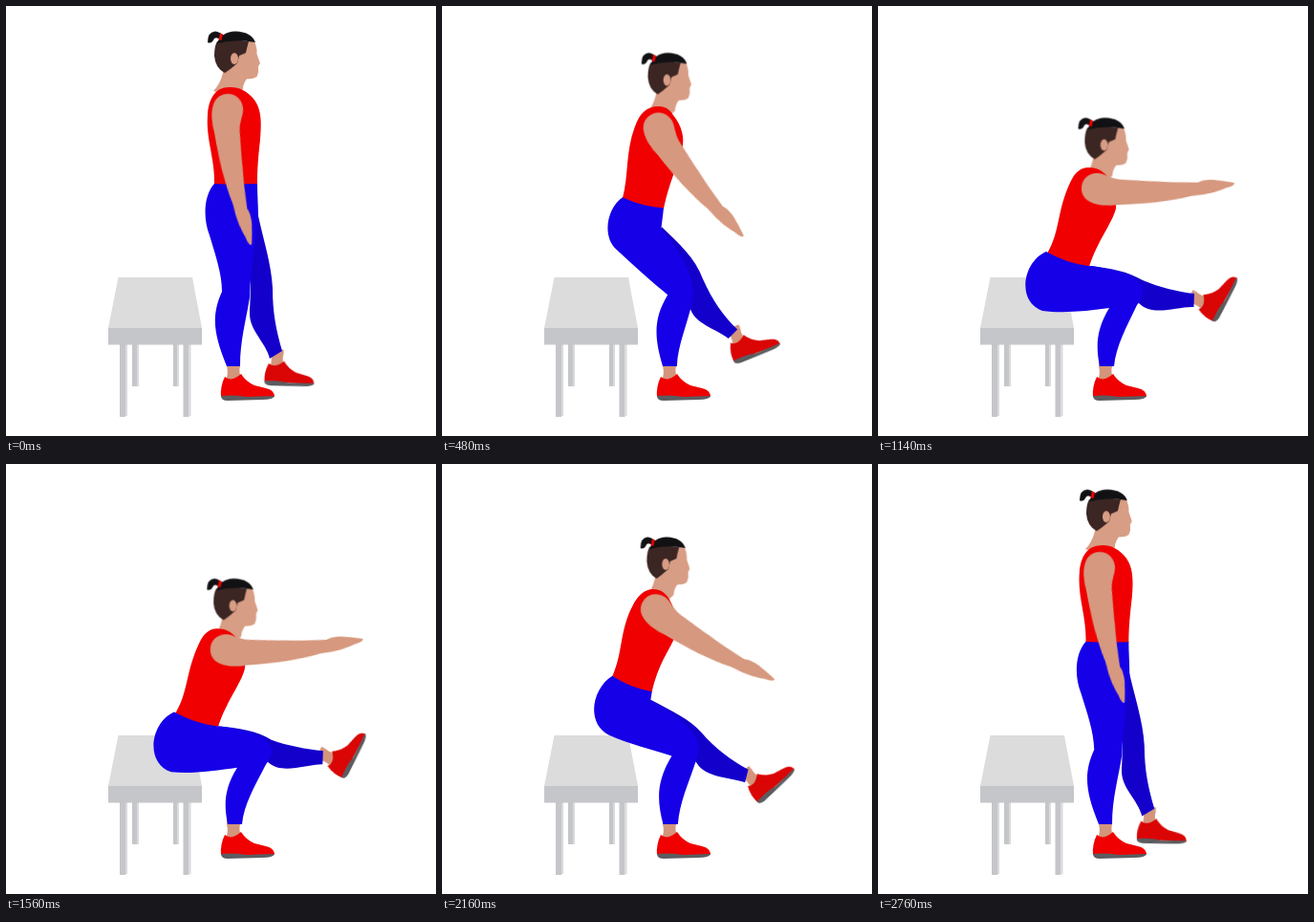
Write an HTML page without scripts that moves like this. It is 450x450 px and loops after 2820 ms.

```html
<!DOCTYPE html>
<html lang="en">
<head>
<meta charset="utf-8">
<title>Single-leg chair squat</title>
<style>
html, body { margin: 0; height: 100%; overflow: hidden; background: #fff; }
svg { display: block; width: 100%; height: 100%; }

/* One pass goes down, the reversed pass comes back up. */
.move { animation: 1410ms linear -2805ms infinite alternate; }
.head { animation-name: head; }
.torso { animation-name: torso; fill: #f00000; }
.arm { animation-name: arm; fill: #d6987e; }
.stand { animation-name: stand; fill: #1500e8; }
.lift { animation-name: lift; fill: #1400cb; }
.foot { animation-name: foot; color: #da0505; }

.skin { fill: #d3957b; }
.face { fill: #d89d85; }
.hair { fill: #3c2623; }
.cap { fill: #111114; }
.red { fill: #f00000; }
.shoe { color: #f00000; }
.upper { fill: currentColor; }
.sole { fill: #5b5c60; }
.top { fill: #dcdcdd; }
.edge { fill: #c5c6ca; }
.side { fill: #d9dadc; }

@keyframes head {
  0% { transform: translate(211px, 27px) scaleX(1); animation-timing-function: cubic-bezier(.5, 0, .8, .4); }
  20% { transform: translate(210px, 31.5px) scaleX(.96); animation-timing-function: cubic-bezier(.33, .17, .7, .62); }
  35% { transform: translate(208.5px, 53px) scaleX(.95); }
  50% { transform: translate(207.5px, 81px) scaleX(.94); }
  65% { transform: translate(207.5px, 106.5px) scaleX(.96); }
  80% { transform: translate(209.5px, 117.5px) scaleX(.97); animation-timing-function: cubic-bezier(.2, .5, .5, 1); }
  100% { transform: translate(210.5px, 121px) scaleX(.97); }
}
@keyframes arm {
  0% { transform: translate(232px, 108px) rotate(80deg); animation-timing-function: cubic-bezier(.5, 0, .8, .4); }
  20% { transform: translate(229px, 111px) rotate(68.3deg); animation-timing-function: cubic-bezier(.33, .17, .7, .62); }
  35% { transform: translate(226px, 131px) rotate(48.4deg); }
  50% { transform: translate(223.5px, 156px) rotate(27.3deg); }
  65% { transform: translate(227px, 181px) rotate(6.1deg); }
  80% { transform: translate(229px, 191px) rotate(-2.4deg); animation-timing-function: cubic-bezier(.2, .5, .5, 1); }
  100% { transform: translate(230px, 195px) rotate(-5deg); }
}
@keyframes foot {
  0% { transform: translate(284px, 364px) rotate(3deg); animation-timing-function: cubic-bezier(.5, 0, .8, .4); }
  20% { transform: translate(289px, 355px) rotate(-8deg); animation-timing-function: cubic-bezier(.33, .17, .7, .62); }
  35% { transform: translate(309.5px, 337px) rotate(-23deg); }
  50% { transform: translate(321px, 321.5px) rotate(-45deg); }
  65% { transform: translate(328px, 310px) rotate(-58.5deg); }
  80% { transform: translate(330.5px, 305px) rotate(-61deg); animation-timing-function: cubic-bezier(.2, .5, .5, 1); }
  100% { transform: translate(331.5px, 303.5px) rotate(-62deg); }
}
@keyframes torso {
  0% { d: path("M218,187 C219,160 209,140 211,114 C212,96 220,85 233,85 C243,84 251,89 255,93 C267,103 268,118 266,140 C264,158 263,170 263,187 Q240,189 218,187 Z"); animation-timing-function: cubic-bezier(.5, 0, .8, .4); }
  20% { d: path("M204,187 C208,165 202,138 206,114 C209,99 217,89 229,89 C237,88 243,91 247,95 C258,104 262,118 260,134 C256,155 249,170 247,193 Q225,195 204,187 Z"); animation-timing-function: cubic-bezier(.33, .17, .7, .62); }
  35% { d: path("M186,204 C193,180 190,155 201,129 C206,115 214,108 226,108 C233,108 238,112 241,118 C250,130 252,142 250,150 C245,170 236,185 229,216 Q206,215 186,204 Z"); }
  50% { d: path("M177,225 C189,200 185,178 199,152 C205,141 212,135 220,135 C228,135 233,139 237,145 C246,162 248,176 243,186 C236,200 224,215 218,243 Q195,240 177,225 Z"); }
  65% { d: path("M176,248 C190,222 186,206 199,177 C204,165 210,160 218,160 C227,160 233,162 238,168 C246,182 249,196 246,206 C240,222 226,240 219,267 Q196,264 176,248 Z"); }
  80% { d: path("M177,259 C191,235 187,215 201,185 C206,174 212,169 220,169 C229,169 234,172 239,177 C247,190 250,202 249,212 C245,228 230,245 221,273 Q197,271 177,259 Z"); animation-timing-function: cubic-bezier(.2, .5, .5, 1); }
  100% { d: path("M177,262 C191,239 188,219 202,189 C207,178 213,173 221,173 C230,173 235,176 240,181 C248,194 252,205 250,215 C246,231 231,248 222,276 Q198,274 177,262 Z"); }
}
@keyframes stand {
  0% { d: path("M218,186 C207,198 206,222 213,240 C219,260 226,280 226,299 C214,325 218,345 231,377 L245,377 C245,350 251,330 255,305 C256,270 262,245 264,220 C264,208 263,197 263,186 Q240,187 218,186 Z"); animation-timing-function: cubic-bezier(.5, 0, .8, .4); }
  20% { d: path("M204,186 C190,197 187,222 200,238 C212,258 222,278 232,299 C217,327 221,347 231,377 L245,377 C246,352 256,330 261,302 C264,280 256,255 246,232 C246,222 247,208 247,193 Q225,193 204,186 Z"); animation-timing-function: cubic-bezier(.33, .17, .7, .62); }
  35% { d: path("M186,203 C169,214 163,246 180,259 C198,274 218,290 237,303 C221,329 223,349 231,377 L246,377 C247,354 257,334 262,311 C268,292 253,262 226,234 C227,228 228,222 229,215 Q206,213 186,203 Z"); }
  50% { d: path("M177,225 C155,238 148,276 174,288 C194,296 220,300 241,306 C225,333 225,352 231.500,377 L247,377 C249,354 258,335 266,312 C276,290 266,275 217,250 C217,248 218,245 218,242 Q195,238 177,225 Z"); }
  65% { d: path("M176,248 C151,260 145,300 171,310 C192,314 220,311 242,313 C227,337 227,356 231.500,377 L247,377 C249,354 259,334 269,311 C284,292 274,278 222,267 C221,267 220,267 219,266 Q196,262 176,248 Z"); }
  80% { d: path("M176,257 C151,268 145,310 172,319 C194,322 220,319 242,316 C228,339 228,357 232,377 L247,377 C249,356 260,336 271,313 C286,294 276,281 224,272 C223,272 222,272 220,272 Q197,269 176,257 Z"); animation-timing-function: cubic-bezier(.2, .5, .5, 1); }
  100% { d: path("M176,260 C151,271 145,314 173,323 C195,325 220,321 242,318 C228,340 228,357 232,377 L247,377 C249,356 260,338 272,315 C287,296 277,283 225,275 C224,275 223,275 221,275 Q198,272 176,260 Z"); }
}
@keyframes lift {
  0% { d: path("M263,215 C268,240 278,270 279,295 C279,322 283,340 289,361 L276,369 C272,352 255,340 255,322 C256,300 258,270 250,230 Z"); animation-timing-function: cubic-bezier(.5, 0, .8, .4); }
  20% { d: path("M246,222 C258,243 270,265 273,289 C278,313 286,335 295,352 L283,358 C277,343 257,335 255,315 C256,295 250,262 236,235 Z"); animation-timing-function: cubic-bezier(.33, .17, .7, .62); }
  35% { d: path("M227,233 C246,250 264,263 273,285 C284,307 296,322 312,336 L303,346 C288,336 264,332 260,314 C258,296 238,280 215,250 Z"); }
  50% { d: path("M217,249 C240,260 259,268 271,280 C286,296 305,309 322,317 L319.500,331 C304,326 278,328 268,313 C255,300 225,290 200,270 Z"); }
  65% { d: path("M219,265 C242,270 262,273 274,284 C290,293 312,301 330,306 L328.500,320 C311,319 285,323 272,310 C258,303 225,300 200,285 Z"); }
  80% { d: path("M220,272 C243,274 262,278 277,287 C294,294 313,299 331,301 L330.500,315 C313,314 288,326 273,311 C258,306 225,303 200,290 Z"); animation-timing-function: cubic-bezier(.2, .5, .5, 1); }
  100% { d: path("M221,275 C244,276 263,280 278,289 C295,295 314,298 332,300 L331.500,314 C314,314 289,326 274,312 C258,308 225,305 200,293 Z"); }
}
</style>
</head>
<body>
<svg viewBox="0 0 450 450">
  <defs>
    <!-- Ankle centre sits at 0,0 -->
    <g id="shoe">
      <path class="skin" d="M-7,-5 L7,-5 L7,0 Q5,7 9,12 L5,19 L-8,16 Q-5,7 -7,0 Z"/>
      <path class="upper" d="M-9,11 Q-2,17 8,8 Q13,16 22,20 L34,23 Q43,25 43,32 L-13,32 Q-14,21 -9,11 Z"/>
      <path class="sole" d="M-13,31 Q2,29.5 14,32 L43,31 Q42,35 30,35 L-6,36 Q-13,36 -13,31 Z"/>
    </g>
    <g id="leg">
      <rect class="edge" width="6" height="76"/>
      <rect class="side" x="6" width="2" height="75"/>
    </g>
  </defs>

  <g>
    <path class="edge" d="M132,354 h5 v44 h-5 Z M175,354 h4 v44 h-4 Z"/>
    <path class="side" d="M137,354 h2 v44 h-2 Z M179,354 h2 v44 h-2 Z"/>
    <use href="#leg" x="119" y="354"/>
    <use href="#leg" x="185.5" y="354"/>
    <path class="top" d="M117.500,284 H195 L205,337 H107 Z"/>
    <rect class="edge" x="107" y="337" width="98" height="17.5"/>
  </g>

  <g class="move foot"><use href="#shoe" transform="scale(.93)"/></g>
  <path class="move lift" d=""/>
  <use class="shoe" href="#shoe" transform="translate(238 377)"/>

  <g class="move head"><g transform="translate(-211 -27)">
    <path class="face" d="M226,64 L254,74 Q248,80 248,87 L238,96 L217,89 Q224,82 227,70 Z"/>
    <path class="face" d="M238,37 H260 Q263,44 262.500,50 L266,60 Q264,62 264,64 Q265,69 262.500,74 Q258,77 250,76 L228,70 Z"/>
    <path class="hair" d="M221,37 Q236,34 254,37 Q252,44 251,49 L244,52 L242,60 Q235,66 229,70 Q219,65 218,52 Q218,42 221,37 Z"/>
    <ellipse class="face" cx="239" cy="55" rx="4" ry="6"/>
    <path class="cap" d="M221,39 Q225,27 240,26.500 Q257,27 261,38 Q240,34 221,39 Z"/>
    <path class="cap" d="M211,38 Q211,27 219,26.500 Q224,27 228,31 L225,36 Q221,32 218,34 Q215,40 211,38 Z"/>
    <path class="red" d="M224,28.500 L227,29.500 L225.500,36 L222.500,35 Z"/>
  </g></g>

  <path class="move torso" d=""/>
  <path class="move stand" d=""/>
  <path class="move arm" d="M-16,0 C-16,-12 -6,-17 2,-16 C9,-15.500 14,-10 24,-8.500 C50,-6 75,-3 106,-2 C115,-6 125,-4 144,0 Q145,3 135,5 C122,10 112,11 98,12 C75,17 50,18 22,18 C0,20 -16,14 -16,0 Z"/>
</svg>
</body>
</html>
```
